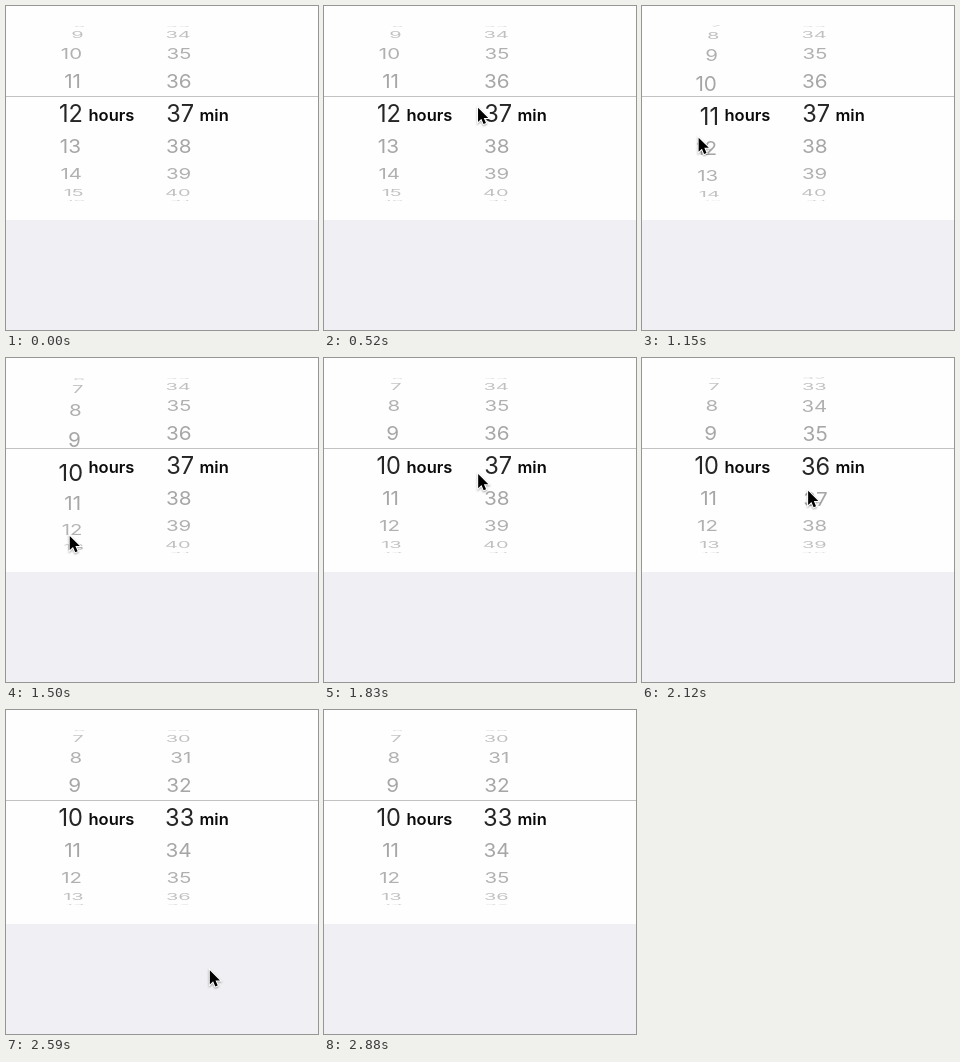
These frames come from a looping animation (312 px wide and 324 px high, 3710 ms). An HTML page with a canvas:

```html
<!DOCTYPE html>
<html lang="en">
<head>
<meta charset="utf-8">
<title>Time picker</title>
<style>
  html, body { margin: 0; width: 100%; height: 100%; overflow: hidden; background: #fefefe; }
  canvas { display: block; width: 312px; height: 324px; }
</style>
</head>
<body>
<canvas id="stage" width="312" height="324"></canvas>
<script>
const ctx = document.getElementById('stage').getContext('2d');
const LOOP = 3710, STEP = 57.4, SNAP = 220;
const CENTER_Y = 107.5, RADIUS = 87, ROW_ANGLE = 21.7 * Math.PI / 180, VANISH_X = 156;
const DRAG_PER_ROW = 34;

const stop = (time, x, y) => ({ time, x, y });
const enter = stop(290, 297, 32);
const hover = stop(800, 86, 121);
const grabHours = stop(925, 51, 94);
const releaseHours = stop(1440, 62, 178);
const grabMinutes = stop(2060, 162, 97);
const dragEnd = stop(2300, 174, 223);
const releaseMinutes = stop(2425, 174, 223);
const leave = stop(2880, 256, 326);
const path = [
  enter, stop(520, 153, 101), hover, grabHours, releaseHours, stop(1500, 63, 177),
  stop(1830, 153, 116), grabMinutes, dragEnd, releaseMinutes, leave
];

function pointerAt(t) {
  const i = path.findIndex(s => s.time > t);
  if (i <= 0) return i ? leave : enter;
  const a = path[i - 1], b = path[i];
  const p = (t - a.time) / (b.time - a.time);
  return { x: a.x + (b.x - a.x) * p, y: a.y + (b.y - a.y) * p };
}

// A wheel follows the pointer while held, then settles on the nearest row.
function wheelValue(t, first, grab, release) {
  const held = Math.min(Math.max(t, grab.time), release.time);
  const value = first - (pointerAt(held).y - grab.y) / DRAG_PER_ROW;
  if (t <= release.time) return value;
  const left = Math.max(0, 1 - (t - release.time) / SNAP) ** 3;
  const rest = Math.round(value);
  return rest + (value - rest) * left;
}

function clipped(y0, y1, draw) {
  ctx.save();
  ctx.beginPath();
  ctx.rect(0, y0, 312, y1 - y0);
  ctx.clip();
  draw();
  ctx.restore();
}

function drawRows(value, right, size, color) {
  ctx.font = `400 ${size}px Inter, sans-serif`;
  ctx.textAlign = 'right';
  for (let n = Math.ceil(value - 4.1); n <= value + 4.1; n++) {
    const angle = (n - value) * ROW_ANGLE;
    const depth = Math.cos(angle);
    if (depth <= 0) continue;
    const scale = 1 - 0.065 * (1 - depth);
    ctx.save();
    ctx.translate(VANISH_X + (right - VANISH_X) * scale, CENTER_Y + RADIUS * Math.sin(angle));
    ctx.scale(scale, depth);
    ctx.fillStyle = color(depth);
    ctx.fillText(n, 0, size * 0.364);
    ctx.restore();
  }
}

function drawWheel(value, right, inset) {
  const side = () => drawRows(value, right - inset, 20.8, d => `rgba(0,0,0,${0.16 + 0.2 * d})`);
  clipped(19, 90, side);
  clipped(124, 196, side);
  clipped(91, 124, () => drawRows(value, right, 23.6, () => '#262626'));
}

function drawPointer({ x, y }) {
  const arrow = new Path2D('M0 0V14.2L3.3 11.1L5.5 16.3L7.9 15.3L5.7 10.2H10.2Z');
  ctx.save();
  ctx.translate(x + 0.8, y + 0.8);
  ctx.shadowColor = 'rgba(0,0,0,.35)';
  ctx.shadowBlur = 2;
  ctx.shadowOffsetY = 1;
  ctx.strokeStyle = '#fff';
  ctx.lineWidth = 2;
  ctx.stroke(arrow);
  ctx.shadowColor = 'transparent';
  ctx.fillStyle = '#000';
  ctx.fill(arrow);
  ctx.restore();
}

function draw(t) {
  // The motion is sampled at a low, steady rate.
  const tick = enter.time + Math.floor((t - enter.time + 10) / STEP) * STEP;

  ctx.fillStyle = '#fefefe';
  ctx.fillRect(0, 0, 312, 324);
  ctx.fillStyle = '#efeff4';
  ctx.fillRect(0, 214, 312, 110);
  ctx.fillStyle = '#c2c2c2';
  ctx.fillRect(0, 90, 312, 1);

  drawWheel(wheelValue(tick, 12, grabHours, releaseHours), 77, 2.4);
  drawWheel(wheelValue(tick, 37, grabMinutes, releaseMinutes), 188.2, 2.4);

  ctx.font = '600 16.5px Inter, sans-serif';
  ctx.textAlign = 'left';
  ctx.fillStyle = '#0a0a0a';
  ctx.fillText('hours', 82.5, 114.6);
  ctx.fillText('min', 193.5, 114.6);

  if (t >= enter.time && t < leave.time) drawPointer(pointerAt(tick));
}

let start;
function frame(now) {
  start ??= now;
  draw((now - start) % LOOP);
  requestAnimationFrame(frame);
}
requestAnimationFrame(frame);
</script>
</body>
</html>
```
